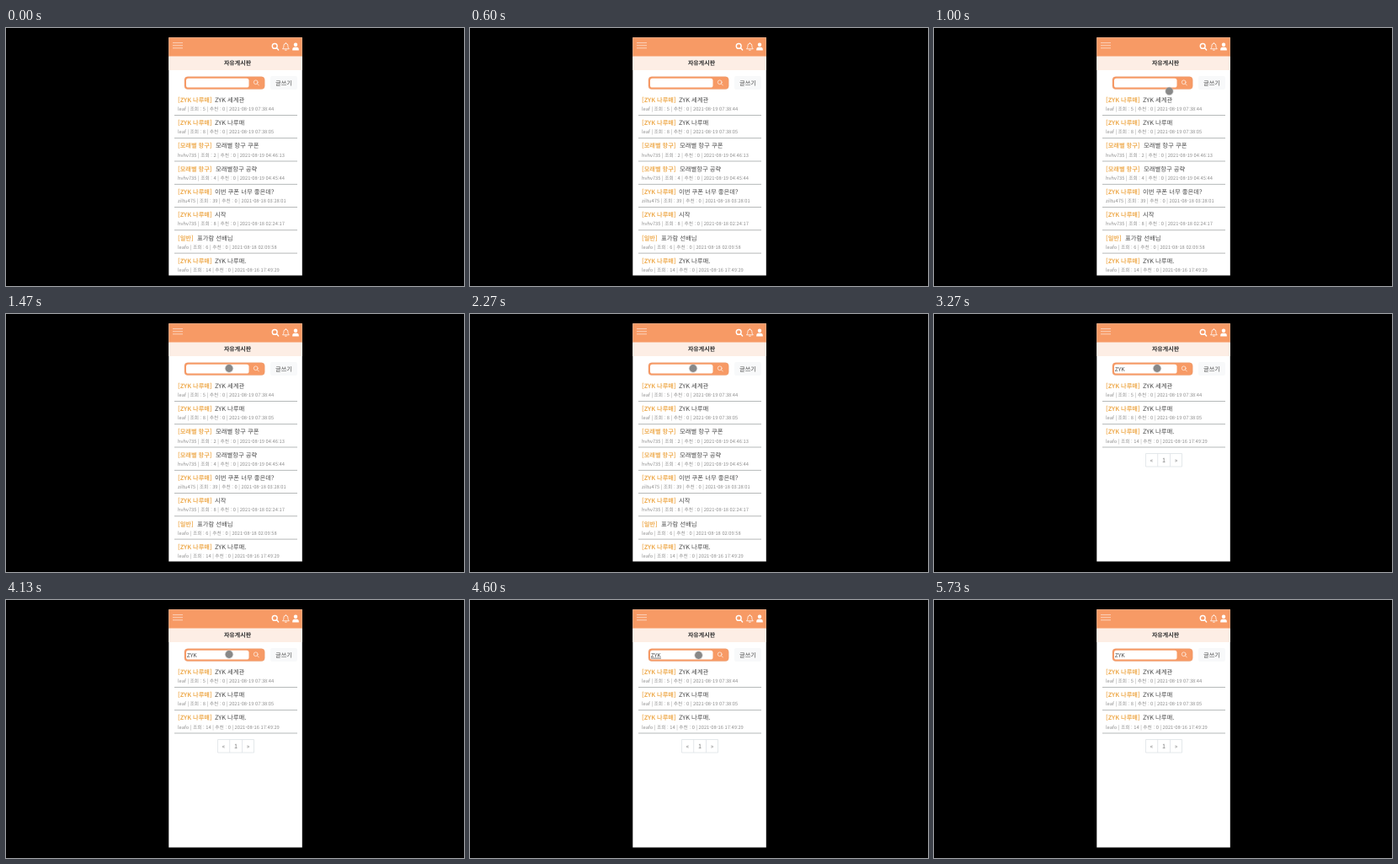
Animation of 544x306 px, one loop 6790 ms. Source, as an HTML page:

```html
<!DOCTYPE html>
<html lang="ko">
<head>
<meta charset="utf-8">
<title>자유게시판</title>
<style>
html, body { margin: 0; width: 100%; height: 100%; overflow: hidden; background: #000; }
svg { display: block; width: 544px; height: 306px; }
text { font: 7.2px "Noto Sans CJK KR", "Noto Sans CJK", "Noto Sans", sans-serif; fill: #4a4a4a; text-rendering: geometricPrecision; white-space: pre; }
.title { font-size: 7.35px; font-weight: 300; }
.tag { font-weight: 700; fill: #efae55; }
.meta { font-size: 5.72px; fill: #8f8f8f; }
.mid { text-anchor: middle; }
.line { fill: none; stroke: #fff; stroke-linecap: round; stroke-linejoin: round; }
</style>
</head>
<body>
<svg viewBox="0 0 544 306">
  <clipPath id="screen"><rect x="193.3" y="11.2" width="158.5" height="282.3"/></clipPath>
  <g clip-path="url(#screen)">
    <path fill="#fff" d="M193 11h159v283h-159z"/>
    <path fill="#f79a65" d="M193 11h159v22.7h-159z"/>
    <path fill="#fdeee5" d="M193 33.7h159v16.3h-159z"/>
    <path stroke="#fdd9c6" stroke-width=".9" d="M198 17.6h12M198 20.7h12M198 23.8h12"/>

    <g class="line" stroke-width="1.4">
      <circle cx="319.2" cy="21.4" r="2.9"/><path d="M321.4 23.6l2.2 2.3"/>
      <path stroke-width=".8" d="M328.8 24.5c1.1-1.2 1.1-2.4 1.1-3.6a2.5 2.5 0 0 1 5 0c0 1.2 0 2.4 1.1 3.6zM332.4 18.2v-.6M331.6 26.2h1.6"/>
    </g>
    <circle cx="344" cy="19.8" r="2.2" fill="#fff"/>
    <path fill="#fff" d="M340.2 26.4v-.9a2.7 2.7 0 0 1 2.7-2.7h2.2a2.7 2.7 0 0 1 2.7 2.7v.9z"/>

    <text class="mid" x="275" y="44" style="font-size:7px;font-weight:700;fill:#333">자유게시판</text>

    <rect x="212" y="57.8" width="95.2" height="14.8" rx="3.8" fill="#f79a65" stroke="#e39a72" stroke-width=".4"/>
    <rect x="214" y="59.8" width="74.5" height="10.8" rx="2.6" fill="#fff"/>
    <g class="line" stroke-width=".7" opacity=".9"><circle cx="296.7" cy="64.3" r="2.4"/><path d="M298.5 66.1l2 2"/></g>
    <text id="query" x="214.8" y="67.7" style="font-size:6.7px"></text>
    <path id="underline" stroke="#444" stroke-width=".7" d="M215 69.1h12"/>
    <path id="caret" stroke="#333" stroke-width=".8" d="M227 60.5v9.5"/>

    <rect x="314" y="57" width="32" height="16" rx="2" fill="#f8f9fa"/>
    <text class="mid" x="330" y="67.6">글쓰기</text>

    <g id="all"></g>
    <g id="found"></g>
    <g id="touch"><circle r="5.2" fill="#bbb" opacity=".5"/><circle r="4.4" fill="#888"/></g>
  </g>
</svg>
<script>
const $ = id => document.getElementById(id);
const LOOP = 6790, WORD = "ZYK";
const game = WORD + " 나루매", other = "모래별 항구";

// category, title, title x, author, views, date
const posts = [
  [game, WORD + " 세계관", 248, "leaf", 5, "2021-08-19 07:38:44"],
  [game, game, 248, "leaf", 8, "2021-08-19 07:38:05"],
  [other, other + " 쿠폰", 249, "hvhv735", 2, "2021-08-19 04:46:13"],
  [other, "모래별항구 공략", 249, "hvhv735", 4, "2021-08-19 04:45:44"],
  [game, "이번 쿠폰 너무 좋은데?", 248, "ziltu475", 39, "2021-08-18 03:28:01"],
  [game, "시작", 248, "hvhv735", 8, "2021-08-18 02:24:17"],
  ["일반", "표가람 선배님", 227, "leafo", 6, "2021-08-18 02:09:58"],
  [game, game + ".", 248, "leafo", 14, "2021-08-16 17:49:29"]
];

const row = ([tag, title, x, author, views, date], i) => `
  <g transform="translate(0 ${i * 27.27})">
    <text class="tag" x="204" y="87.9">[${tag}]</text>
    <text class="title" x="${x}" y="87.9">${title}</text>
    <text class="meta" x="204" y="98">${author} | 조회 : ${views} | 추천 : 0 | ${date}</text>
    <rect x="200" y="103.1" width="146" height=".7" fill="#979b9b"/>
  </g>`;

const pager = `
  <path fill="none" stroke="#dee2e6" stroke-width=".8" d="M251.5 165.5h43v15.5h-43zM265.7 165.5v15.5M280.5 165.5v15.5"/>` +
  ["«", "1", "»"].map((s, i) => `<text class="mid" x="${258.5 + i * 14.5}" y="175.7" style="fill:#777">${s}</text>`).join("");

$("all").innerHTML = posts.map(row).join("");
$("found").innerHTML = [0, 1, 7].map(i => posts[i]).map(row).join("") + pager;

// pointer path: time, x, y
const path = [[700, 296, 103], [1000, 279.5, 75], [1400, 265, 64.5], [4430, 265, 64.5], [4600, 271.5, 65.5], [5330, 271.5, 65.5]];

function pointer(t) {
  const n = path.findIndex(p => p[0] > t);
  if (n < 1) return null;
  const [a, b] = [path[n - 1], path[n]], k = (t - a[0]) / (b[0] - a[0]);
  return [1, 2].map(c => a[c] + (b[c] - a[c]) * k);
}

const show = (id, on) => $(id).style.display = on ? "" : "none";
const within = (t, a, b) => t >= a && t < b;

function draw(now) {
  const t = now % LOOP, p = pointer(t), searched = t >= 3265;
  $("query").textContent = WORD.slice(0, [2500, 2700, 2900].filter(k => t >= k).length);
  show("all", !searched);
  show("found", searched);
  show("underline", within(t, 4200, 5330));
  show("caret", within(t, 5130, 5330));
  show("touch", p);
  if (p) $("touch").setAttribute("transform", `translate(${p})`);
  requestAnimationFrame(draw);
}
requestAnimationFrame(draw);
</script>
</body>
</html>
```
